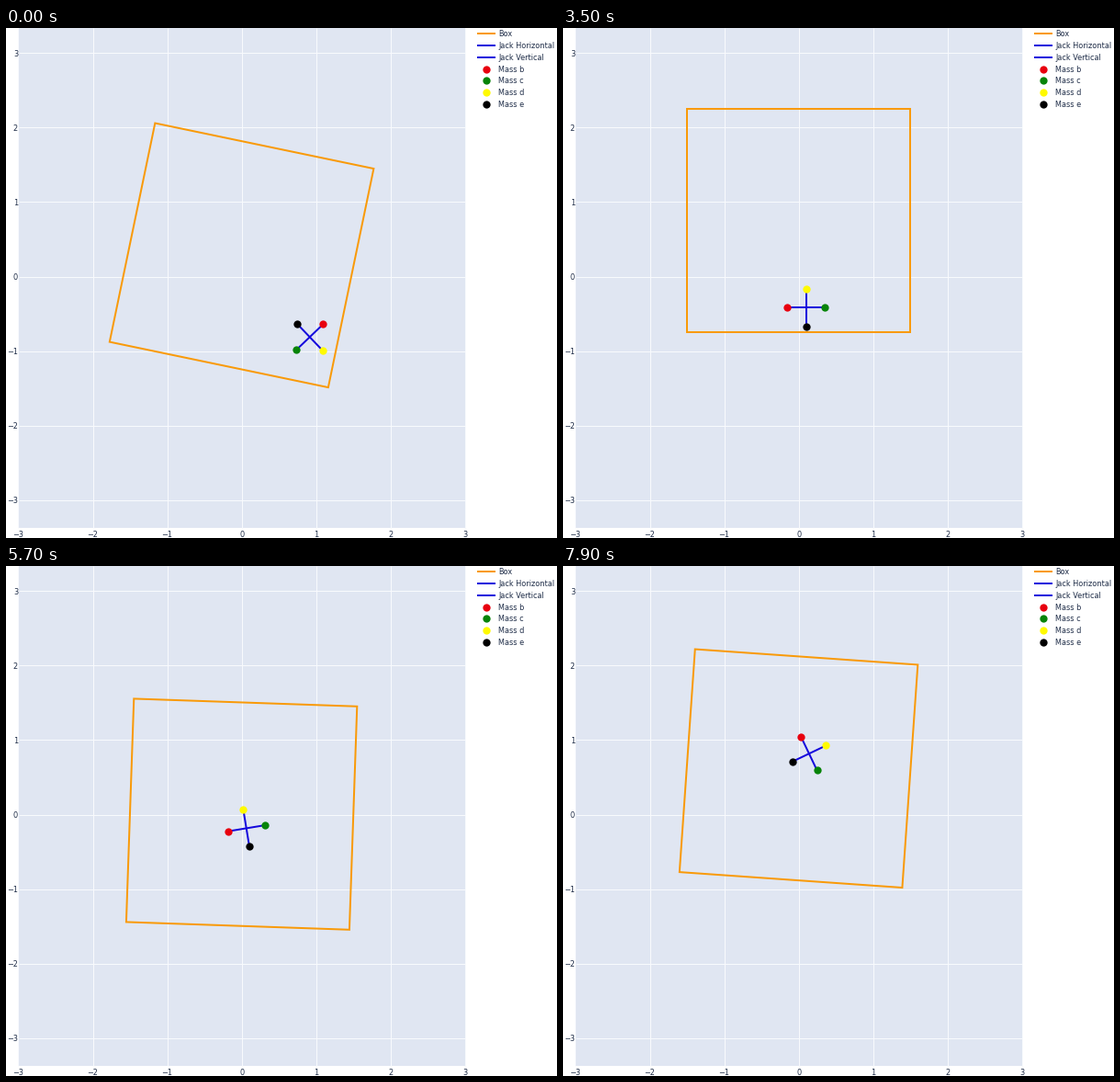
Write a matplotlib script that moves like this. It is 600x555 px and loops after 8 s.

```python
import numpy as np
import matplotlib.pyplot as plt
from matplotlib.animation import FuncAnimation
from matplotlib.patches import Polygon, Rectangle

W, H, DPI = 600, 555, 100
FRAMES, STEP = 80, 100
PT = 72 / DPI                      # points per pixel
UNIT, X0, Y0 = 81.05, 256.6, 270.5  # plot scale and zero point in pixels
START = 1.8                        # the simulation begins here, in seconds
GRAVITY = 0.8
SIDE, ARM = 3.0, 0.25

INK, PANEL, GRID = "#1f2d48", "#e0e6f2", "#f8fafd"
ORANGE, BLUE = "#f99a08", "#1408dc"
MASSES = [("Mass b", "#e8000f", 180), ("Mass c", "#078409", 0),
          ("Mass d", "#fffa00", 90), ("Mass e", "#000000", 270)]

# Jack at its release, each impact and the end: time, x, y, turn in degrees
IMPACTS = np.array([(START, .1, 1.2, 0), (3.55, .1, -.5, 0),
                    (4.84, .1, 1.544, 0), (6.13, .045, -1.27, 14),
                    (7.3, .16, 1.68, 438), (7.9, .14, .818, 655.5)])


def jack_pose(t):
    """Free flight with steady spin between impacts."""
    i = np.clip(np.searchsorted(IMPACTS[:, 0], t), 1, len(IMPACTS) - 1)
    (ta, *a), (tb, *b) = IMPACTS[i - 1:i + 1]
    x, y, turn = np.array(a) + np.subtract(b, a) * (t - ta) / (tb - ta)
    return x, y + GRAVITY / 2 * (t - ta) * (tb - t), np.radians(turn)


def box_pose(t):
    """Shaken up and down; impacts start a slow tilt and a sag."""
    lift = .397 * (1 - np.cos(np.pi / 2 * (t - START)))
    sag = .228 * np.sin(np.pi / 3 * max(t - 5.7, 0))
    return lift - sag, -.016 * max(t - IMPACTS[1, 0], 0)


def pose(t):
    if t < START - 1e-6:           # the earlier run, at rest
        return (.286, -.205), (.915, -.812, np.radians(223.7))
    return box_pose(t), jack_pose(t)


def px(x, y):
    return X0 + UNIT * x, Y0 - UNIT * y


def polar(cx, cy, r, angle):
    return px(cx + r * np.cos(angle), cy + r * np.sin(angle))


fig = plt.figure(figsize=(W / DPI, H / DPI), dpi=DPI, facecolor="white")
ax = fig.add_axes([0, 0, 1, 1])
ax.set(xlim=(0, W), ylim=(H, 0))
ax.axis("off")


def stroke(xs, ys, color, width, **kw):
    return ax.plot(xs, ys, color=color, lw=width * PT,
                   solid_capstyle="butt", **kw)[0]


def dot(x, y, color):
    return ax.plot([x], [y], "o", color=color, ms=8.3 * PT, mew=0,
                   zorder=5)[0]


def label(x, y, text, **kw):
    ax.text(x, y, text, size=8.2 * PT, color=INK, family="DejaVu Sans", **kw)


# Plot area, grid and tick labels
ax.add_patch(Rectangle((14, 0), 486, 544, color=PANEL, lw=0, zorder=0))
for k in range(-3, 4):
    gx, gy = px(k, k)
    text = str(k).replace("-", "\u2212")
    stroke([gx, gx], [0, 544], GRID, 1, zorder=1)
    stroke([14, 500], [gy, gy], GRID, 1, zorder=1)
    label(gx, 553.5, text, ha="center")
    label(13, gy + 3.2, text, ha="right")

# Legend
rows = [("Box", ORANGE), ("Jack Horizontal", BLUE), ("Jack Vertical", BLUE)]
rows += [m[:2] for m in MASSES]
for i, (name, color) in enumerate(rows):
    y = 6.3 + 12.75 * i
    if i < 3:
        stroke([513.2, 533.2], [y, y], color, 2)
    else:
        dot(523.2, y, color)
    label(536.5, y + 3, name)

box = ax.add_patch(Polygon(np.zeros((4, 2)), fill=False, ec=ORANGE,
                           lw=2 * PT, joinstyle="miter", zorder=3))
bars = [stroke([], [], BLUE, 2, zorder=4) for _ in range(2)]
dots = [dot(0, 0, color) for _, color, _ in MASSES]


def update(frame):
    (lift, tilt), (jx, jy, turn) = pose(frame * STEP / 1000)
    corners = np.radians([135, 45, -45, -135]) + tilt
    box.set_xy([polar(0, lift, SIDE / 2 ** .5, a) for a in corners])
    tips = [polar(jx, jy, ARM, turn + np.radians(a)) for *_, a in MASSES]
    for bar, pair in zip(bars, (tips[:2], tips[2:])):
        bar.set_data(*zip(*pair))
    for mark, (x, y) in zip(dots, tips):
        mark.set_data([x], [y])
    return [box, *bars, *dots]


anim = FuncAnimation(fig, update, frames=FRAMES, interval=STEP,
                     repeat=True, repeat_delay=0)
plt.show()
```
